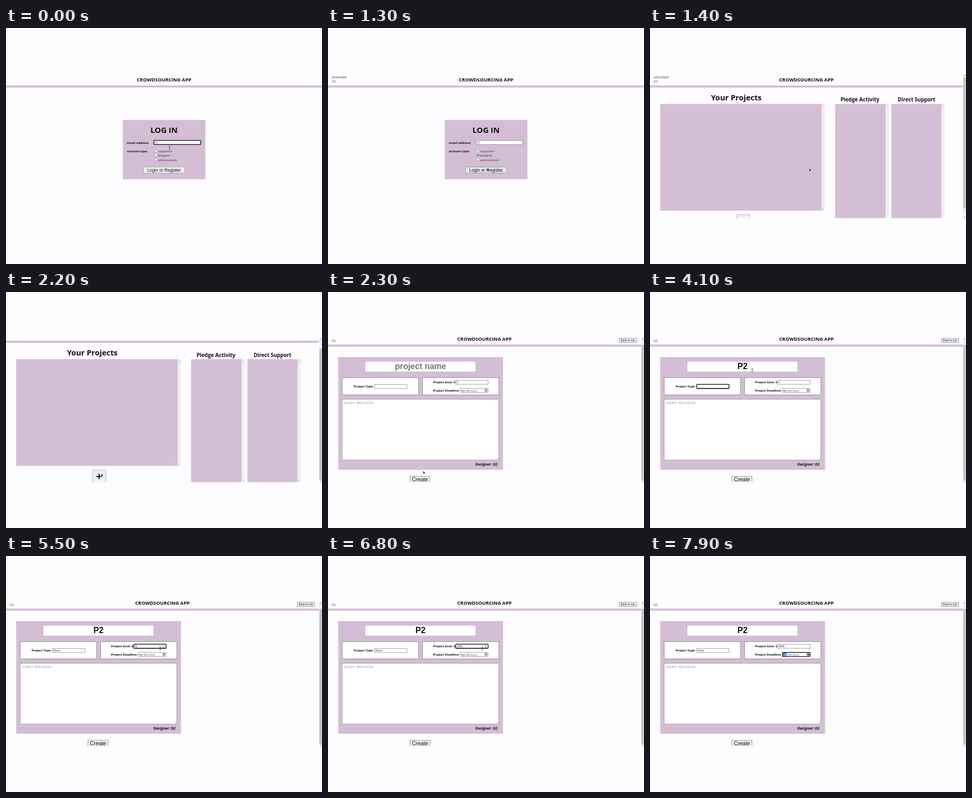
These frames come from a looping animation (600 by 450 pixels, 8 s). An HTML page:

```html
<!DOCTYPE html>
<html lang="en">
<head>
<meta charset="utf-8">
<title>Crowdsourcing app</title>
<style>
html, body { margin: 0; width: 100%; height: 100%; overflow: hidden; background: #fdfcfe; }
svg { display: block; width: 600px; height: 450px; }
text { font-family: "Open Sans", "Noto Sans", sans-serif; fill: #111; white-space: pre; }
.b { font-weight: 700; }
.i { font-style: italic; }
.ar { font-family: "Liberation Sans", Arial, sans-serif; }
.mono { font-family: "Liberation Mono", monospace; }
.mid { text-anchor: middle; }
</style>
</head>
<body>
<svg id="stage" viewBox="0 0 600 450"></svg>
<script>
const LOOP = 8000, STEP = 100, MAX_SCROLL = 16.7;
const MAUVE = '#d4bed5', GREY = '#767676', SOFT = '#b9b4ba';

const rect = (x, y, w, h, fill, stroke = 'none', lw = 0.7, r = 0) =>
  `<rect x="${x}" y="${y}" width="${w}" height="${h}" rx="${r}" fill="${fill}" stroke="${stroke}" stroke-width="${lw}"/>`;
const text = (x, y, size, cls, str, fill = '#111') =>
  `<text x="${x}" y="${y}" font-size="${size}" class="${cls}" style="fill:${fill}">${str}</text>`;
const during = (from, to, body) => `<g class="timed" data-from="${from}" data-to="${to}">${body}</g>`;
const ring = (x, y, w, h) => rect(x, y, w, h, 'none', '#111', 1.3, 1);
const caret = (x, y, h) => rect(x, y, 0.6, h, '#111');
const tri = (x, y, dir, fill = '#777') =>
  `<path d="M${x - 1.5} ${y + dir * 0.8}h3l-1.5 ${-dir * 1.8}z" fill="${fill}"/>`;
const radio = (y, on) =>
  `<circle cx="284.5" cy="${y}" r="2.3" fill="#fff" stroke="${on ? '#1673d1' : '#858085'}" stroke-width=".6"/>` +
  (on ? `<circle cx="284.5" cy="${y}" r="1.4" fill="#1673d1"/>` : '');
const track = (x, y, h) =>
  rect(x, y, 6, h, '#f1eff1') + tri(x + 3, y + 3.5, 1, '#aaa') + tri(x + 3, y + h - 3, -1, '#aaa');
const pageBar = thumb =>
  rect(594.5, 87, 5.5, 276, '#f1f0f2') + tri(597.3, 90, 1) + tri(597.3, 360.8, -1) + thumb;

function loginPage() {
  return rect(0, 109.5, 600, 4, MAUVE) +
    during(0, 1000, rect(588, 109.5, 12, 4, '#c9c5ca')) +
    text(300, 101.6, 9.2, 'b mid', 'CROWDSOURCING APP') +
    during(1200, 1400, text(7, 96.2, 5.9, '', 'DESIGNER', '#333') + text(7, 104, 5.9, '', 'D2', '#333')) +
    rect(222, 175.5, 156.3, 112.7, MAUVE, '#d3ced4') +
    text(300, 199.6, 14.9, 'b mid', 'LOG IN') +
    text(229.6, 220.8, 5.8, 'b', 'email address:') +
    text(229.6, 236.5, 5.8, 'b', 'account type:') +
    rect(280.5, 214.3, 89.2, 7.8, '#fff', GREY) +
    text(282, 220, 5, 'ar', 'D2', '#555') +
    during(0, 600, ring(280.5, 214.3, 89.2, 7.8)) +
    radio(234.3) + radio(242.6) + radio(251) +
    during(600, 1400, radio(242.6, true)) +
    ['supporter', 'designer', 'administrator'].map((s, n) =>
      text(288.8, 236.7 + n * 8.4, 5.8, '', s, '#333')).join('') +
    rect(261.3, 265, 77.8, 11.6, '#efefef', '#9a969b') +
    during(900, 1400, rect(261.3, 265, 77.8, 11.6, '#e6e5e7', '#8e8a8f')) +
    text(300, 273.7, 8.4, 'ar mid', 'Login or Register');
}

function listPage() {
  return '<g id="list">' +
    text(297, 84.9, 9.2, 'b mid', 'CROWDSOURCING APP') +
    text(7, 79.5, 5.9, '', 'DESIGNER', '#333') + text(7, 87.3, 5.9, '', 'D2', '#333') +
    rect(0, 92.8, 594.5, 4, MAUVE) +
    text(163.8, 121.2, 14.6, 'b mid', 'Your Projects') +
    text(398.6, 123.6, 10, 'b mid', 'Pledge Activity') +
    text(506, 123.6, 9.9, 'b mid', 'Direct Support') +
    rect(19.3, 128, 306.7, 203.5, MAUVE) + track(326, 128, 203.5) +
    rect(351.5, 128, 96, 235, MAUVE) + track(447.5, 128, 235) +
    rect(458.3, 128, 95.4, 235, MAUVE) + track(553.7, 128, 235) +
    rect(164.2, 339.2, 25.6, 26, '#efefef', '#a8a5a9') +
    '<path d="M171.5 351.8h10.4M176.7 346.6v10.4" stroke="#111" stroke-width="2"/></g>' +
    pageBar('<rect id="thumb" x="595" y="94" width="4.6" height="250" fill="#c1c0c2"/>');
}

// Text that is typed: each entry starts at its time and lasts until the next.
const typed = (x, y, size, cls, entries) => entries.map(([at, str, fill], n) =>
  during(at, n + 1 < entries.length ? entries[n + 1][0] : LOOP, text(x, y, size, cls, str, fill))).join('');

function formPage() {
  return rect(0, 100.2, 594.5, 4, MAUVE) +
    text(297, 92.8, 9.2, 'b mid', 'CROWDSOURCING APP') +
    text(7, 95, 5.9, '', 'D2', '#333') +
    rect(553.3, 88.2, 32.6, 8.2, '#efefef', GREY) +
    text(569.5, 94.2, 5.1, 'ar mid', 'Back to List') +
    rect(19.4, 124, 312.8, 215, MAUVE) +
    rect(70.5, 132.2, 210, 20, '#fff', SOFT) +
    typed(175.6, 147.4, 15.6, 'ar b mid', [[2300, 'project name', GREY], [3000, 'P'], [3100, 'P2']]) +
    during(2700, 3300, ring(70.5, 132.2, 210, 20)) +
    rect(27, 163.2, 145, 33, '#fff', GREY, 0.8) +
    rect(179.4, 163.2, 145.2, 33, '#fff', GREY, 0.8) +
    text(48.7, 182, 5.9, 'b', 'Project Type:') +
    rect(88.6, 176.2, 61.4, 7.8, '#fff', GREY) +
    typed(90.2, 182, 5.1, 'ar', ['M', 'Mu', 'Mus', 'Musi', 'Music'].map((s, n) => [4300 + n * 100, s, '#444'])) +
    during(3300, 5200, ring(88.6, 176.2, 61.4, 7.8)) +
    during(3300, 3800, caret(90, 178, 4.8)) +
    text(199.5, 174.2, 5.9, 'b', 'Project Goal: $') +
    rect(242.3, 168.2, 61.7, 7.8, '#fff', GREY) +
    typed(244, 174, 5.1, 'ar', [[2300, '0', '#444'], [5900, ''], [6100, '2'], [6300, '20'],
      [6400, '200'], [6500, '2000', '#333']]) +
    during(5200, 7700, ring(242.3, 168.2, 61.7, 7.8) + tri(299.5, 170.7, 1, '#444') + tri(299.5, 173.7, -1, '#444')) +
    during(5300, 5800, caret(247, 169.8, 4.8)) +
    text(199.5, 189.8, 5.9, 'b', 'Project Deadline:') +
    rect(251.6, 183.8, 52.4, 7.8, '#fff', GREY) +
    during(7700, LOOP, rect(252.4, 184.8, 6.8, 5.9, '#1668b8')) +
    typed(253, 189.6, 5, 'mono', [[2300, 'mm', '#444'], [7700, 'mm', '#fff']]) +
    text(259, 189.6, 5, 'mono', '/dd/yyyy', '#555') +
    '<path d="M298.2 186v3.6h3.4v-3.6zM298 186.3h3.8" fill="none" stroke="#222" stroke-width=".7"/>' +
    during(7700, LOOP, ring(251.6, 183.8, 52.4, 7.8)) +
    rect(27, 204.6, 297.2, 115.7, '#fff', '#8d888e') +
    text(31, 213.4, 4.83, 'mono', 'project description', GREY) +
    '<path d="M320.4 319.2l3-3M322.2 319.2l1.2-1.2" stroke="#777" stroke-width=".6"/>' +
    text(279.8, 331.3, 7.15, 'b i', 'Designer: D2') +
    rect(155.7, 351.2, 38, 14, '#efefef', GREY) +
    text(174.6, 361.2, 10.3, 'ar mid', 'Create') +
    pageBar(rect(595, 101, 4.6, 257, '#c1c0c2'));
}

const stage = document.getElementById('stage');
stage.innerHTML =
  '<defs><clipPath id="view"><rect y="87" width="600" height="275.5"/></clipPath></defs>' +
  rect(0, 0, 600, 450, '#fdfcfe') +
  '<g clip-path="url(#view)">' +
  during(0, 1400, loginPage()) + during(1400, 2300, listPage()) + during(2300, LOOP, formPage()) +
  '</g><g id="pointer">' +
  '<path id="arrow" d="M0 0v5.2l1.3-1.2 1 2 .9-.5-.9-1.9h1.7z" fill="#111" stroke="#fff" stroke-width=".3"/>' +
  '<path id="beam" d="M-1.5-2.8h3M0-2.8v5.6M-1.5 2.8h3" fill="none" stroke="#222" stroke-width=".7"/></g>';

// Pointer keys: time, x, y, shape.
const path = [
  [0, 310.5, 228.3, 'beam'], [100, 302, 222, 'arrow'], [300, 262, 207, 'arrow'],
  [500, 282, 240, 'arrow'], [600, 284, 243, 'arrow'], [700, 287, 251, 'arrow'],
  [900, 302, 270, 'arrow'], [1100, 302.5, 268, 'arrow'], [1400, 302.5, 268, 'arrow'],
  [1900, 190, 346, 'arrow'], [2200, 180.8, 346.5, 'arrow'], [2300, 180.8, 341.3, 'arrow'],
  [2400, 183, 312, 'beam'], [2600, 193, 165, 'beam'], [2700, 194, 148.6, 'beam'],
  [4700, 194, 148.6, 'beam'], [5100, 288, 173, 'beam'], [5300, 292.8, 176.2, 'beam'],
  [7400, 292.8, 176.2, 'beam'], [7600, 299, 184.5, 'arrow'], [7700, 299.3, 185, 'arrow'],
  [LOOP, 299.3, 185, 'arrow']
];

const $ = id => document.getElementById(id);
const timed = [...document.querySelectorAll('.timed')].map(el => ({
  el, from: +el.dataset.from, to: +el.dataset.to
}));
const ease = p => p * p * (3 - 2 * p);
const span = (t, a, b) => Math.min(1, Math.max(0, (t - a) / (b - a)));

function draw(t) {
  for (const { el, from, to } of timed) el.style.display = t >= from && t < to ? '' : 'none';

  const p = ease(span(t, 1800, 2100));
  $('list').setAttribute('transform', `translate(0 ${MAX_SCROLL * (1 - p)})`);
  $('thumb').setAttribute('y', 94 + 14 * p);

  const n = path.findIndex((k, i) => t >= k[0] && t < path[i + 1][0]);
  const [a, x, y, shape] = path[n], [b, x2, y2] = path[n + 1];
  const q = ease(span(t, a, b));
  $('pointer').setAttribute('transform', `translate(${x + (x2 - x) * q} ${y + (y2 - y) * q})`);
  $('arrow').style.display = shape === 'arrow' ? '' : 'none';
  $('beam').style.display = shape === 'beam' ? '' : 'none';
}

const start = performance.now();
function tick() {
  const t = (performance.now() - start) % LOOP;
  draw(Math.floor(t / STEP) * STEP);
  requestAnimationFrame(tick);
}
tick();
</script>
</body>
</html>
```
